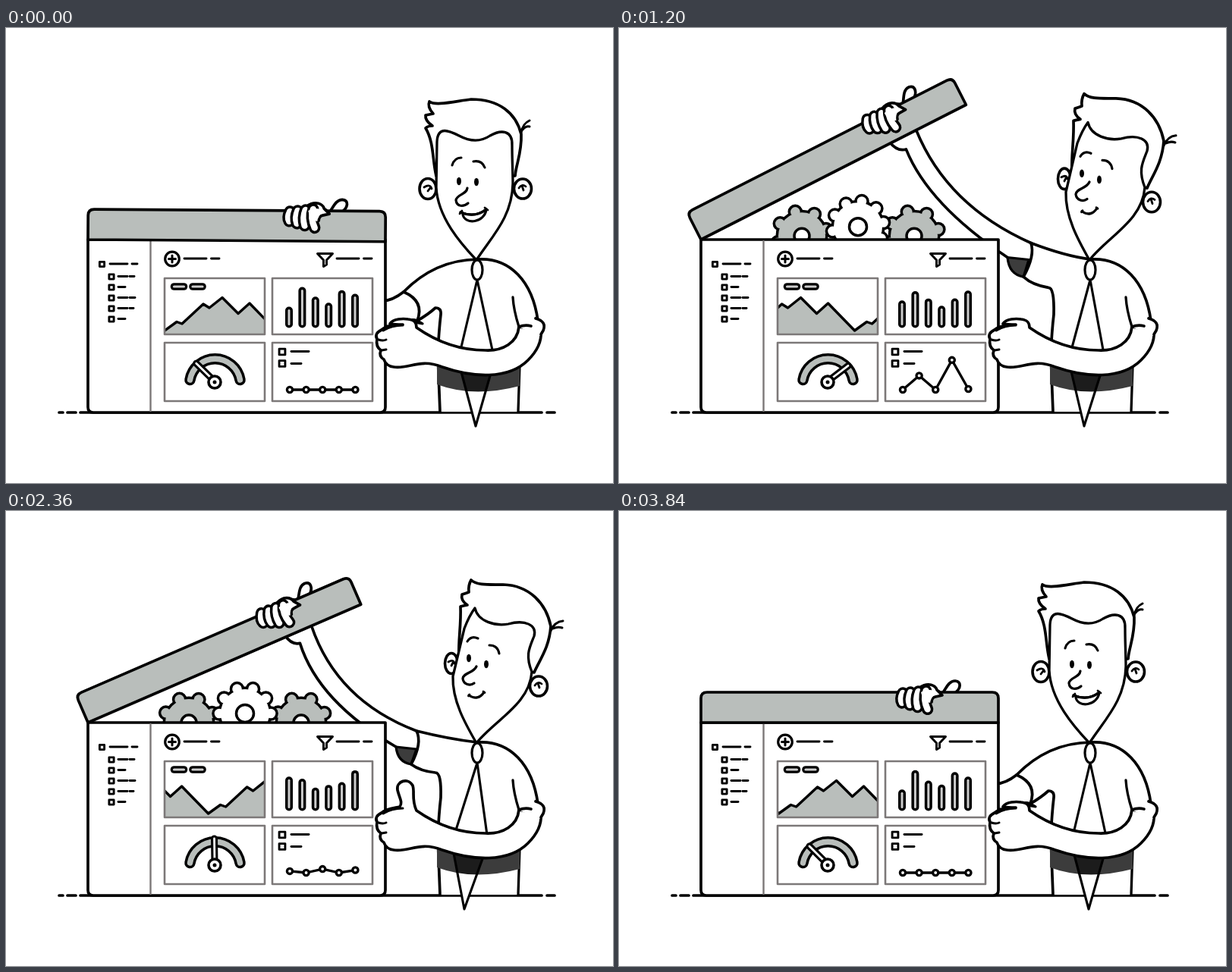
An HTML page with a canvas for the animation above (3.88 s loop, 800 by 600 pixels).

```html
<!DOCTYPE html>
<html lang="en">
<head>
<meta charset="utf-8">
<title>Opening the dashboard box</title>
<style>
html, body { margin: 0; width: 100%; height: 100%; overflow: hidden; background: #fff; }
canvas { display: block; width: 800px; height: 600px; }
</style>
</head>
<body>
<canvas id="stage" width="800" height="600"></canvas>
<script>
const LOOP = 3880, STEP = 40, TAU = 2 * Math.PI, RAD = Math.PI / 180;
const INK = '#000', PAPER = '#fff', GREY = '#b9bebb', PALE = '#ccc', EDGE = '#7c7878', SHADE = '#3c3c3c', DEEP = '#1c1c1c';
const ctx = document.getElementById('stage').getContext('2d');
ctx.lineCap = ctx.lineJoin = 'round';

const lerp = (a, b, k) => a + (b - a) * k;
const smooth = (a, b, x) => {
  const u = Math.min(1, Math.max(0, (x - a) / (b - a)));
  return u * u * (3 - 2 * u);
};
// A resting value plus eased moves [from, to, amount]
const moves = (t, rest, ...list) => list.reduce((v, [a, b, d]) => v + d * smooth(a, b, t), rest);

// Blend two path strings of the same structure
function mix(a, b, k) {
  const nums = b.match(/-?[\d.]+/g);
  let i = 0;
  return a.replace(/-?[\d.]+/g, n => lerp(+n, +nums[i++], k).toFixed(2));
}
const mapY = (d, f) => d.replace(/([\d.]+) ([\d.]+)/g, (_, x, y) => `${x} ${f(+x, +y).toFixed(2)}`);

function draw(d, fill, stroke = INK, width = 3.7) {
  const p = new Path2D(d);
  if (fill) { ctx.fillStyle = fill; ctx.fill(p); }
  if (stroke) { ctx.strokeStyle = stroke; ctx.lineWidth = width; ctx.stroke(p); }
}
const line = (d, width, color = INK) => draw(d, null, color, width);
function oval(x, y, rx, ry, fill, width = 3.2, stroke = INK) {
  ctx.beginPath();
  ctx.ellipse(x, y, rx, ry, 0, 0, TAU);
  if (fill) { ctx.fillStyle = fill; ctx.fill(); }
  if (width) { ctx.strokeStyle = stroke; ctx.lineWidth = width; ctx.stroke(); }
}
const square = (x, y, s) => draw(`M${x - s} ${y - s}h${2 * s}v${2 * s}h${-2 * s}z`, PAPER, INK, 2.9);
const dash = (x0, x1, y) => line(`M${x0} ${y}H${x1}`, 2.9);
const capsule = (d, outer, inner, fill) => { line(d, outer); line(d, inner, fill); };

function gear(x, y, teeth, radius, deg, fill, hole) {
  // Outline first, then the fill on top joins all parts
  for (const width of [7, 0]) {
    const part = (cx, cy, r) => oval(cx, cy, r, r, width ? null : fill, width);
    for (let i = 0; i < teeth; i++) {
      const a = deg * RAD + TAU / teeth * i;
      part(x + radius * Math.sin(a), y - radius * Math.cos(a), 6.3);
    }
    part(x, y, radius - 2);
  }
  oval(x, y, hole, hole, PAPER, 3.5);
}
function gears(t) {
  const dy = moves(t, 50, [640, 1220, -55], [1240, 1560, 5], [2880, 3800, 50]);
  const rot = -dy / 2 - 12 * (1 - smooth(1600, 2300, t));
  for (const x of [241, 389]) gear(x, 279 + dy, 8, 33, 23 - rot * .7, GREY, 10);
  gear(315, 267 + dy, 10, 34, 18 + rot, PAPER, 11.5);
}

function areaChart(t) {
  const wave = [[0, 399], [16, 387.5], [23, 390], [51, 364], [59, 369], [76, 355.5], [97, 376.5], [112, 363]];
  const x0 = 209 - 147 * t / LOOP;
  const pts = [0, 147, 294].flatMap(s => wave.map(([x, y]) => `${x0 + s + x} ${y}`)).join('L');
  ctx.save();
  ctx.beginPath();
  ctx.rect(209, 330, 132, 74);
  ctx.clip();
  draw(`M${pts}V404H${x0}Z`, GREY, null);
  line('M' + pts, 3.4);
  ctx.restore();
  for (const x of [221.5, 246]) capsule(`M${x} 341h13`, 9.6, 3.2, PALE);
}

function barChart(t) {
  // Mean top, swing and phase of each bar
  const bars = [[360, 9, 0], [349, 6, .5], [362, 7, .58], [362, 6, .2], [352, 8, .35], [347.5, 4.5, 0]];
  bars.forEach(([top, amp, phase], i) => {
    const y = top + amp * Math.cos(TAU * (t / LOOP * 4 - phase));
    capsule(`M${373 + 17.4 * i} ${y + 3.5}V390.5`, 10, 3, PALE);
  });
}

function gauge(t) {
  capsule('M242.5 464A33.5 33.5 0 0 1 308.5 464', 14.5, 7.4, GREY);
  const a = (11 - 56.5 * Math.cos(TAU * t / LOOP * 2)) * RAD;
  capsule(`M275 466L${275 + 34 * Math.sin(a)} ${466 - 34 * Math.cos(a)}`, 9, 2.8, PAPER);
  oval(275, 467, 8, 8, PAPER, 3.6);
  oval(275, 467, 2.5, 2.5, INK, 0);
}

function lineChart(t) {
  const half = LOOP / 2, u = t % half;
  const rise = smooth(150, 1300, u) * (1 - smooth(1620, 1890, u));
  const peaks = t < half ? [0, 19, 0, 40, 1] : [15, 0, 35, 0, 25];
  const pts = peaks.map((p, i) => [374 + 21.6 * i, 477 - p * rise]);
  line('M' + pts.map(p => p.join(' ')).join('L'), 3.3);
  for (const [x, y] of pts) oval(x, y, 3.6, 3.6, PAPER, 3.3);
  [399, 389].forEach((x, i) => {
    square(364, 427 + 15.5 * i, 3.9);
    dash(376, x, 426.5 + 16 * i);
  });
}

function box(t) {
  draw('M108 279H500V500Q500 507 493 507H115Q108 507 108 500Z', PAPER);
  line('M190.5 281V505', 2.4, EDGE);
  square(126.5, 311.5, 3.1);
  dash(137, 160, 311);
  dash(166, 173, 311);
  [169, 157, 170, 168, 157].forEach((end, i) => {
    const y = 328 + 14 * i;
    square(139, y, 3.1);
    dash(148, Math.min(end, 160), y - .5);
    if (end > 160) dash(163, end, y - .5);
  });
  oval(219, 304.5, 9.3, 9.3, PAPER);
  line('M214.5 304.5h9M219 300v9', 3);
  line('M410.5 297.5H430.5L422.5 306V312L418.5 314.5V306Z', 3);
  for (const x of [235, 436]) { dash(x, x + 29, 304); dash(x + 35.5, x + 46, 304); }
  areaChart(t);
  barChart(t);
  gauge(t);
  lineChart(t);
  for (const x of [209, 351]) line(`M${x} 330h132v74h-132zM${x} 415h132v77h-132z`, 2.6, EDGE);
}

function lid(deg) {
  ctx.save();
  ctx.translate(108, 279);
  ctx.rotate(-deg * RAD);
  draw('M303 -34C306 -44 312 -45 317 -37C323 -44 326 -55 335 -55C344 -54 342 -45 336 -40L324 -32Z', PAPER);
  draw('M0 0V-32Q0 -40 8 -40H384Q392 -40 392 -32V0Z', GREY);
  // The grip stays a little more upright than the lid
  ctx.translate(285, -33);
  ctx.rotate(deg * .35 * RAD);
  draw('M3 -13C15 -21 24 -16 26 -10Q30 -6 33 -3L24 -1Q19 0 19 6L5 9Z', PAPER);
  for (let i = 0; i < 4; i++) {
    const x = 10.2 * i - 20;
    capsule(`M${x + 1} ${-6 - i}Q${x - 3} 2 ${x + (i > 2 ? 3 : 0)} ${7 + 2.8 * i}`, 15.4, 8.4, PAPER);
  }
  draw('M5 -7C13 -12 25 -10 24 -5Q18 0 17 7L8 4Z', PAPER, null);
  ctx.restore();
}

// The sleeve blends from lowered to raised, the wrist rides on the lid
function armPose(deg) {
  const c = Math.cos(deg * RAD), s = Math.sin(deg * RAD);
  const onLid = (x, y) => `${108 + x * c + y * s} ${279 - x * s + y * c}`;
  const k = Math.pow(Math.max(0, deg) / 23.4, .75);
  const [top, cuff, end, low, topBend, lowBend, shoulder, under, pit] = mix(
    '524 348,552 360,542 386,532 387,470 390,450 420,565 306,556 378,566 369',
    '541 290,549 306,534 334,514 311,436 250,412 252,585 301,546 343,566 345', k).split(',');
  return {
    top, cuff, end, low, topBend, lowBend, shoulder, under, pit,
    hold: onLid(lerp(345, 321, k), 0), wrist: onLid(lerp(325, 298, k), lerp(2, 15, k)),
    heelBend: onLid(lerp(322, 287, k), lerp(2, 13, k)), heel: onLid(lerp(320, 284, k), -2)
  };
}
function arm(p) {
  const over = `M${p.hold}Q${p.topBend} ${p.top}`;
  const under = `${p.low}Q${p.lowBend} ${p.wrist}Q${p.heelBend} ${p.heel}`;
  draw(`${over}L${p.cuff}L${under}Z`, PAPER, null);
  line(over);
  line('M' + under);
  const [x, y] = p.low.split(' ').map(Number), [ex, ey] = p.end.split(' ').map(Number);
  draw(`M${x} ${y}Q${x + 2} ${ey - 3} ${ex} ${ey}L${ex + 7} ${y + 3}Z`, SHADE, INK, 3.2);
}

const handDrop = t => moves(t, 0, [1300, 1600, 14], [1600, 1960, -14], [2860, 3320, -9], [3400, 3840, 9]);

function body(t, p) {
  const left = `M621 305Q${p.shoulder} ${p.top}Q${p.cuff} ${p.end}Q${p.under} ${p.pit}Q574 ${p.pit.split(' ')[1]} 573 378C571 395 570 410 569 430L572 506`;
  const right = 'C665 302 694 335 701 386';
  draw(`${left}H675L677 445L701 386C694 335 665 302 621 305Z`, PAPER, null);
  line(left);
  line('M621 305' + right);
  line('M668 355Q669 372 676 394M677 445L675 506', 3.3);

  const swing = moves(t, -2, [600, 1000, -6], [1200, 1600, 15], [1680, 2240, -24], [2360, 2840, 15]);
  const y = 470 + Math.max(0, handDrop(t)) * .35;
  const shadow = new Path2D(`M568 440V${y}Q616 ${y + 18} 677 ${y + 2}V440Z`);
  const lean = swing / 193 * 108;
  const tie = `M621 332L${597 + lean} 438L${621 + swing} 525L${645 + lean} 438Z`;
  ctx.fillStyle = SHADE;
  ctx.fill(shadow);
  draw(tie, PAPER, null);
  ctx.save();
  ctx.clip(shadow);
  draw(tie, DEEP, null);
  ctx.restore();
  line(tie, 3.1);
  oval(621, 319, 7, 13, PAPER);
}

function forearm(t) {
  const thumb = moves(t, 0, [1320, 1520, 1], [3400, 3800, -1]), drop = handDrop(t);
  // The drop fades out toward the elbow
  const lower = d => mapY(d, (x, y) => y + drop * Math.min(1, Math.max(0, (640 - x) / 95)));
  const tip = mix('C541 388 538 385 530 384C524 383 510 383 506 390C512 391 518 391 523 391',
    'C534 380 539 371 536 362C530 351 514 356 516 368C519 380 523 384 519 390', thumb);
  draw(lower('M676 394C674 415 655 426 632 425C600 425 568 414 541 395' + tip
    + 'C510 392 500 393 495 398Q485 403 489 410Q487 420 494 425Q491 433 498 437Q501 446 511 447'
    + 'C532 450 545 435 575 447C615 461 662 464 688 438C702 424 706 412 705 400Z'), PAPER);
  line(lower('M497 399Q508 392 523 392M491 411Q497 413 501 411M495 425L501 424'), 3);
  draw('M676 394L698 384Q712 387 708 398L702 408Z', PAPER, null);
  line('M676 394Q684 391 692 393M698 383Q713 387 708 399L705 404');
}

function head(t) {
  const turn = moves(t, 0, [740, 1180, 1], [1380, 1600, -.67], [1720, 2060, .67], [2880, 3820, -1]);
  const tall = moves(t, 1, [560, 800, -.035], [840, 1120, .055], [1200, 1560, -.02]);
  const smile = moves(t, 1, [860, 1180, -1], [2600, 3240, 1]);
  const part = (a, b, fill, width) => draw(mix(a, b, turn), fill, INK, width);
  ctx.save();
  ctx.translate(0, 306);
  ctx.scale(1, tall);
  ctx.translate(0, -306);

  const earX = lerp(681, 702, turn), earY = lerp(212, 231, turn * turn);
  oval(lerp(556, 587, turn), lerp(212, 201, turn), lerp(11, 8.5, turn), 13.5, PAPER, 3.6);
  part('M551 210Q559 205 561 212M556 215L559 211', 'M583 199Q590 195 591 201M587 204L589 200', null, 2.8);
  part('M567 195C562 175 564 150 553 132Q556 129 562 129Q552 122 553 115Q558 114 563 113Q555 104 558 97C566 103 590 97 613 94C650 94 672 112 679 140C680 165 672 180 671 195Z',
    'M597 190C596 170 600 150 599 126Q602 125 608 124Q599 118 601 110Q605 109 610 107Q609 98 613 91C620 98 635 97 655 97C690 98 712 122 718 152C716 180 704 195 696 213Z', PAPER, 3.7);
  part('M568 150C569 128 585 136 597 142C612 150 626 150 638 142C652 134 668 134 667 155C667 175 668 190 668 205C667 250 640 275 620 306C600 285 569 250 567 210Z',
    'M604 155C609 142 612 136 618 128C622 146 645 152 662 149C684 143 700 150 696 165C690 180 684 190 693 212C690 255 645 275 620 306C605 280 588 250 589 218Z', PAPER, 3.3);
  oval(earX, earY, 11.5, 13, PAPER, 3.6);
  line(`M${earX - 5} ${earY - 1}Q${earX - 1} ${earY - 7} ${earX + 4} ${earY - 3}M${earX - 1} ${earY - 4}L${earX + 1} ${earY + 2}`, 2.8);
  part('M679 138Q681 126 690 122M681 134Q685 129 690 130', 'M718 158Q723 146 734 145M721 155Q727 152 733 154', null, 3);

  part('M588 181Q591 171 600 171M616 176Q627 174 631 184', 'M608 172Q613 164 622 168M637 177Q648 177 650 188', null, 3.1);
  const shut = t >= 1520 && t < 1680;
  for (const i of [0, 1]) {
    const x = lerp(597, 610, turn) + 23 * i, y = lerp(202, 194, turn) + (1 + 7 * turn) * i;
    if (shut) line(`M${x - 4} ${y + 1}Q${x} ${y - 3} ${x + 4} ${y + 1}`, 3);
    else oval(x, y, 3, 5.2, INK, 0);
  }
  part('M608 211C607 220 594 219 593 227C594 236 603 236 609 231', 'M620 205C616 214 603 213 602 221C603 229 612 231 617 227', null, 3.2);

  const w = lerp(10, 17, smile), x = lerp(616, 620, turn), y = 243;
  const lip = `M${x - w} ${y}Q${x + 2} ${y + 8} ${x + w} ${y - 4}`;
  if (smile > .1) draw(`${lip}C${x + w - 2} ${y + 14 * smile} ${x - w + 6} ${y + 17 * smile} ${x - w + 3} ${y + 3}`, PAPER, INK, 3.2);
  line(lip, 3.2);
  const tick = 1 + smile;
  line(`M${x - w - tick / 2} ${y + tick}L${x - w + tick} ${y - tick}M${x + w - tick} ${y - 4 - tick}L${x + w + tick} ${y - 4 + tick / 2}`, 2.8);
  ctx.restore();
}

function render(t) {
  ctx.fillStyle = PAPER;
  ctx.fillRect(0, 0, 800, 600);
  line('M70 507H75M81 507H92M98 507H706M713 507H723');
  const lift = moves(t, -.4, [0, 160, .4], [720, 1210, 27], [1210, 1480, -3.6], [2400, 3360, -5.3], [3360, 3840, -18.1]);
  const pose = armPose(lift);
  arm(pose);
  gears(t);
  box(t);
  lid(lift);
  body(t, pose);
  forearm(t);
  head(t);
}

const start = performance.now();
function tick() {
  const t = (performance.now() - start) % LOOP;
  render(Math.floor(t / STEP) * STEP);
  requestAnimationFrame(tick);
}
tick();
</script>
</body>
</html>
```
